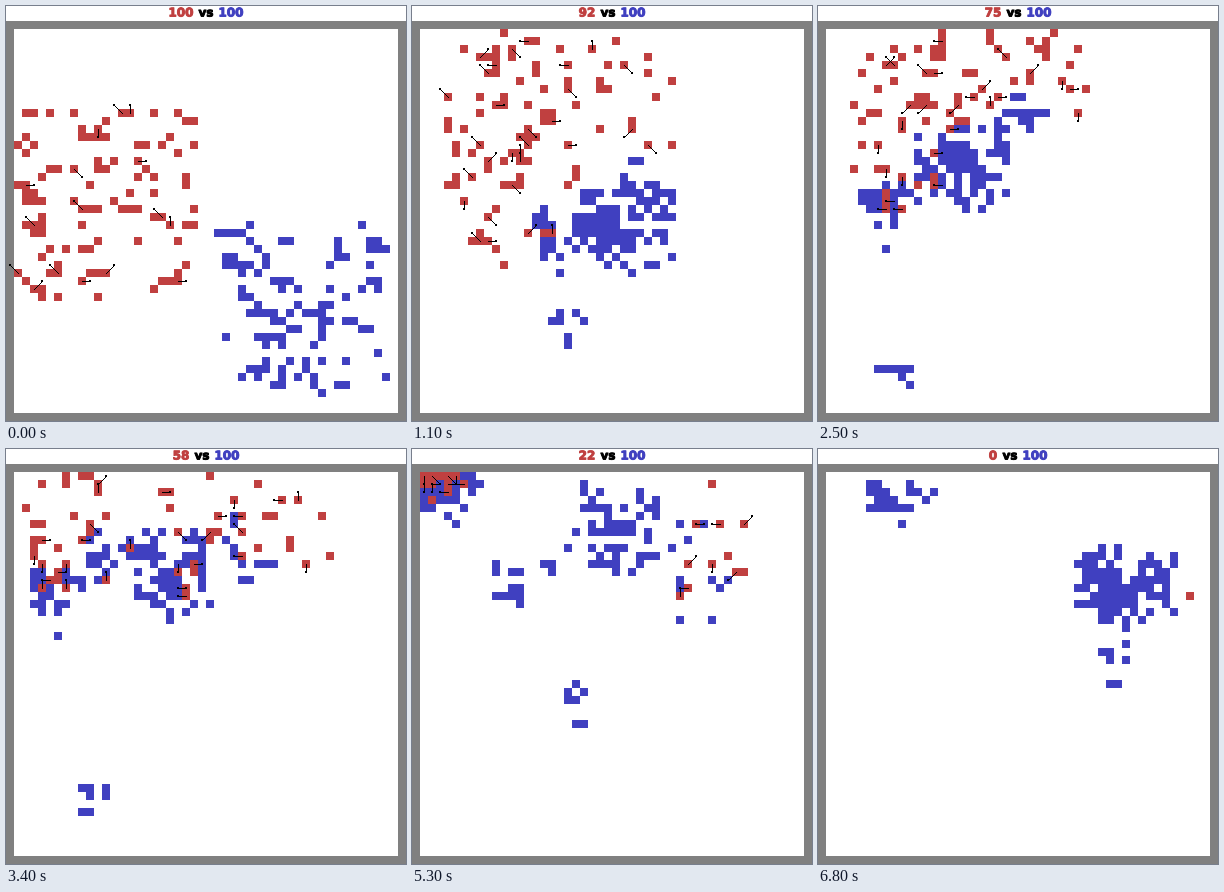
Recreate the animation shown at these times as a matplotlib script. Size 400 by 415 pixels, loop 6900 ms.

```python
import itertools

import matplotlib.pyplot as plt
import numpy as np
from matplotlib import patheffects
from matplotlib.animation import FuncAnimation

W, H, TOP, CELL, SIZE = 400, 415, 15, 8, 48
DPI = 80  # divides both sides exactly
FRAMES, INTERVAL = 69, 100
RED, BLUE, WALL = (192, 64, 64), (64, 64, 192), (128, 128, 128)
TIMES = [0, 5, 17, 25, 41, 53, 68]
RED_LEFT = [100, 99, 85, 75, 45, 22, 1]
rng = np.random.default_rng(11)


class Squad:
    """Units scattered around a centre that travels along (x, y, rx, ry)."""

    def __init__(self, n, *path):
        self.path = np.array(path, float).T
        self.square = rng.uniform(-1, 1, (n, 2))
        reach = np.abs(self.square).max(1) / np.hypot(*self.square.T)
        self.disc = self.square * reach[:, None]
        self.phase = rng.uniform(0, 2 * np.pi, (n, 2))
        self.rank = np.arange(n) / n

    def at(self, t, sway):
        x, y, rx, ry = (np.interp(t, TIMES, v) for v in self.path)
        loose = min(t / TIMES[1], 1)  # the square line-up turns into a swarm
        off = self.square + (self.disc - self.square) * loose
        return ((x, y) + off * (rx, ry)
                + sway * loose * np.cos(self.phase + 0.55 * t))


def army(squads, t, sway):
    """All units on whole cells, squads interleaved."""
    order = np.argsort(np.concatenate([s.rank for s in squads]), kind="stable")
    cells = np.concatenate([s.at(t, sway) for s in squads])[order]
    return np.clip(np.rint(cells), 0, SIZE - 1).astype(int)


red_camp, blue_camp = (11, 21.5, 11.4, 12), (36, 34.5, 10.4, 10.6)

reds = [
    Squad(50, red_camp, (17, 14, 14, 13), (20, 7, 13, 8), (22, 6, 11, 7),
          (32, 9, 12, 9), (36, 10, 5, 8), (44, 16, 0, 0)),
    Squad(50, red_camp, (11, 17, 10, 18), (9, 13, 6, 14), (9, 12, 6, 12),
          (5, 4, 6, 6), (2, 1, 3, 2), (2, 1, 3, 2)),
]
blues = [
    Squad(48, blue_camp, (31, 29, 7.5, 5.5), (20, 19, 6, 6), (18, 16, 5, 6),
          (20, 8, 6, 6), (24, 6.5, 5.5, 6), (37, 13.5, 7, 5)),
    Squad(20, blue_camp, (22, 31, 4, 5), (13, 23, 5, 5), (8, 23, 4, 5),
          (3, 11, 4, 5), (4, 3, 5, 4), (9, 4, 5, 3)),
    Squad(14, blue_camp, (28, 25, 5, 4), (20, 22, 6, 4), (14, 16, 4, 4),
          (10, 5, 4, 3), (13, 13, 5, 3), (37, 13.5, 7, 5)),
    Squad(11, blue_camp, (26, 24, 4, 4), (29, 14, 2, 2), (25, 10, 2, 2),
          (32, 10, 5, 8), (35, 12, 5, 9), (37, 13.5, 7, 5)),
    Squad(7, blue_camp, (21, 35, 3, 2), (15, 36, 6, 5), (9, 42, 4, 2),
          (10, 37, 2, 5), (19, 26, 3, 5), (36, 22, 3, 5)),
]


def spread(cells, taken):
    """Move units off occupied cells to the nearest free one."""
    out = []
    for c, r in cells.tolist():
        reach, ring = 0, []
        while not ring:
            xs = range(max(c - reach, 0), min(c + reach, SIZE - 1) + 1)
            ys = range(max(r - reach, 0), min(r + reach, SIZE - 1) + 1)
            ring = [p for p in itertools.product(xs, ys) if p not in taken]
            reach += 1
        spot = min(ring, key=lambda p: (p[0] - c) ** 2 + (p[1] - r) ** 2)
        taken.add(spot)
        out.append(spot)
    return np.array(out)


def aims(red, blue, dice):
    """Weapons as (cell, direction): foes in reach draw them more often."""
    gap = blue[None] - red[:, None]
    dist = np.hypot(gap[..., 0], gap[..., 1])
    keen = 1 - 0.5 * len(red) / 100
    turns = [d for d in itertools.product((-1, 0, 1), repeat=2) if any(d)]
    for i, cell in enumerate(red):
        j = dist[i].argmin()
        if dist[i, j] <= 2:
            if dice.random() < keen:
                yield cell, np.sign(gap[i, j])
        elif dice.random() < 0.22:
            yield cell, turns[dice.integers(8)]
    for j, cell in enumerate(blue):
        i = dist[:, j].argmin()
        if dist[i, j] < 1.5 and dice.random() < 0.12:
            yield cell, -np.sign(gap[i, j])


def picture(t):
    taken = set()
    alive = int(np.interp(t, TIMES, RED_LEFT))
    red = spread(army(reds, t, 1.2)[:alive], taken)
    blue = spread(army(blues, t, 0.7), taken)
    grid = np.full((SIZE + 2, SIZE + 2, 3), WALL, np.uint8)
    grid[1:-1, 1:-1] = 255
    for cells, color in ((blue, BLUE), (red, RED)):
        grid[cells[:, 1] + 1, cells[:, 0] + 1] = color
    img = np.full((H, W, 3), 255, np.uint8)
    img[TOP:] = grid.repeat(CELL, 0).repeat(CELL, 1)
    for (c, r), (dx, dy) in aims(red, blue, np.random.default_rng(t)):
        x, y = 12 + CELL * c, 27 + CELL * r
        for k in range(CELL + 1):
            img[y + k * dy, x + k * dx] = 0
        x, y = x + CELL * dx, y + CELL * dy
        img[y - 1:y + 1, x - 1:x + 1] = 0
    return img, len(red), len(blue)


fig = plt.figure(figsize=(W / DPI, H / DPI), dpi=DPI, facecolor="white")
ax = fig.add_axes([0, 0, 1, 1])
ax.axis("off")
view = ax.imshow(np.full((H, W, 3), 255, np.uint8), extent=(0, W, H, 0),
                 interpolation="nearest", aspect="auto")


def label(text, color):
    rgb = np.array(color) / 255
    heavy = patheffects.withStroke(linewidth=0.8, foreground=rgb)
    return ax.text(W / 2, 10.5, text, color=rgb, ha="center", va="baseline",
                   family="DejaVu Sans", weight="bold",
                   fontsize=12 * 72 / DPI, path_effects=[heavy])


left, mid, right = label("", RED), label("vs", (0, 0, 0)), label("", BLUE)


def draw(t):
    img, n, m = picture(t)
    view.set_data(img)
    n = n if t < FRAMES - 1 else 0
    left.set_text(str(n))
    right.set_text(str(m))
    a, b, gap = 8 * len(str(n)), 8 * len(str(m)), 26
    x = (W - a - gap - b) / 2
    left.set_x(x + a / 2)
    mid.set_x(x + a + gap / 2)
    right.set_x(x + a + gap + b / 2)
    return view, left, mid, right


anim = FuncAnimation(fig, draw, frames=FRAMES, interval=INTERVAL,
                     repeat=True, repeat_delay=0, blit=False)
plt.show()
```
